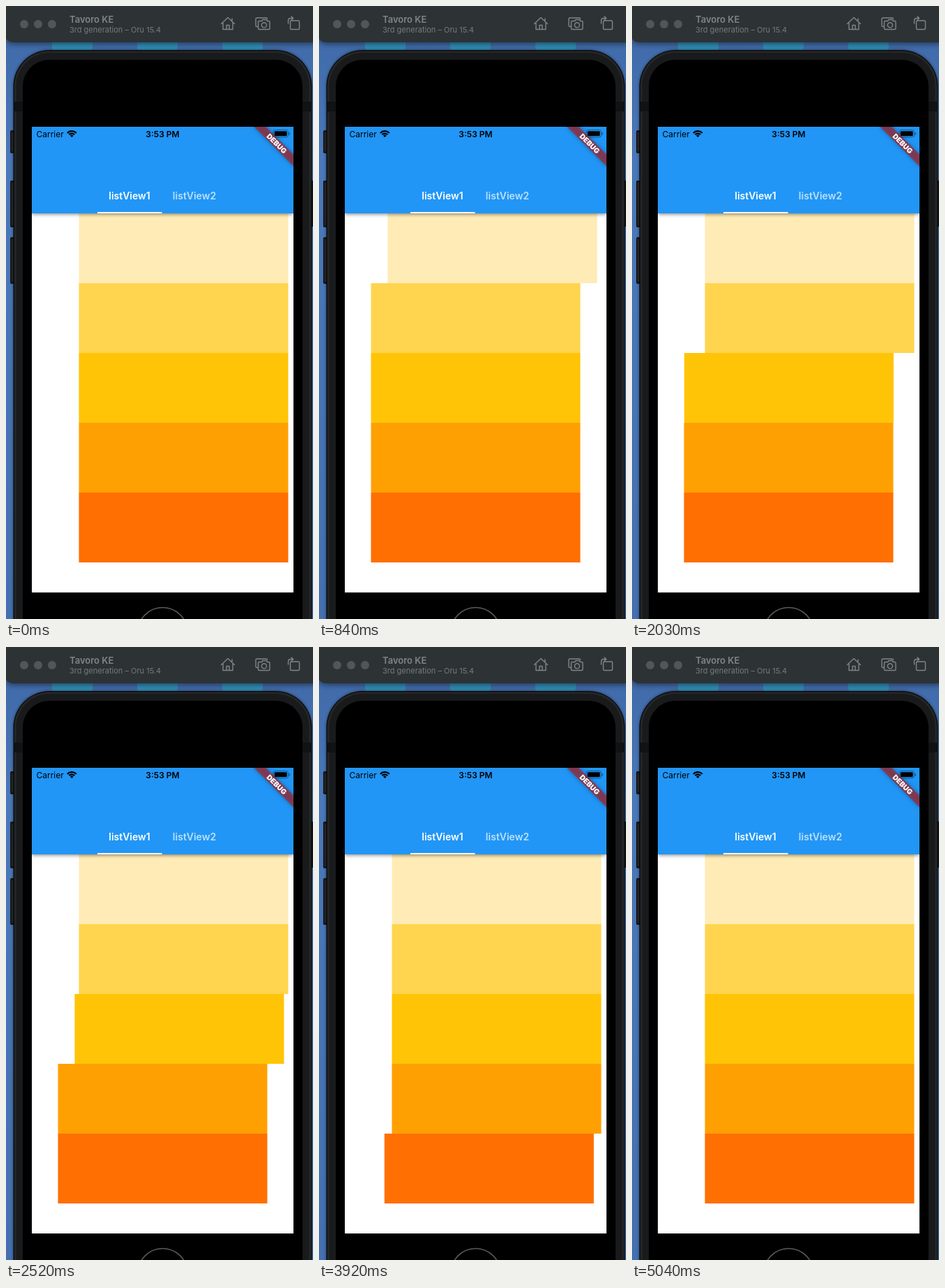
Write an HTML page with a canvas that moves like this. It is 440 by 878 pixels and loops after 5.18 s.

```html
<!DOCTYPE html>
<html lang="en">
<head>
<meta charset="utf-8">
<title>Bouncing rows</title>
<style>
  html, body { margin: 0; width: 100%; height: 100%; overflow: hidden; background: #000; }
  canvas { display: block; width: 440px; height: 878px; }
</style>
</head>
<body>
<canvas id="stage" width="440" height="878"></canvas>
<script>
const W = 440, H = 878;
const ctx = document.getElementById('stage').getContext('2d');
const FONT = 'Inter, Roboto, sans-serif';

const LOOP = 5180, STEP = 70;
const RESET = 280, START = 315, ROW_TIME = 840;
const SCREEN = { x: 37, y: 173, w: 375, h: 667 };
const BAR_H = 124;
const ROW = { x: 74.5, y: 297, w: 300, h: 100, shift: 30 };
const COLORS = ['#ffebb5', '#ffd54f', '#ffc406', '#ffa002', '#ff6f02'];

function bounceOut(t) {
  if (t < 1 / 2.75) return 7.5625 * t * t;
  if (t < 2 / 2.75) { t -= 1.5 / 2.75; return 7.5625 * t * t + 0.75; }
  if (t < 2.5 / 2.75) { t -= 2.25 / 2.75; return 7.5625 * t * t + 0.9375; }
  t -= 2.625 / 2.75;
  return 7.5625 * t * t + 0.984375;
}

function rect(x, y, w, h, color) {
  ctx.fillStyle = color;
  ctx.fillRect(x, y, w, h);
}

function rounded(x, y, w, h, r, color) {
  ctx.fillStyle = color;
  ctx.beginPath();
  ctx.roundRect(x, y, w, h, r);
  ctx.fill();
}

function disc(x, y, r, color) {
  ctx.fillStyle = color;
  ctx.beginPath();
  ctx.arc(x, y, r, 0, Math.PI * 2);
  ctx.fill();
}

function text(str, x, y, font, color, align = 'left') {
  ctx.font = `${font} ${FONT}`;
  ctx.fillStyle = color;
  ctx.textAlign = align;
  ctx.textBaseline = 'alphabetic';
  ctx.fillText(str, x, y);
}

function line(path, color, width) {
  ctx.strokeStyle = color;
  ctx.lineWidth = width;
  ctx.lineJoin = ctx.lineCap = 'round';
  ctx.stroke(new Path2D(path));
}

function withShadow(color, blur, dy, draw) {
  ctx.save();
  ctx.shadowColor = color;
  ctx.shadowBlur = blur;
  ctx.shadowOffsetY = dy;
  draw();
  ctx.restore();
}

function drawDesktop() {
  const g = ctx.createLinearGradient(0, 52, 0, H);
  g.addColorStop(0, '#416baa');
  g.addColorStop(0.2, '#4a78ba');
  g.addColorStop(1, '#4470b0');
  rect(0, 0, W, H, g);
  for (const x of [66, 188, 310]) rounded(x, 40, 58, 23, 3, '#318db5');
}

function drawToolbar() {
  withShadow('rgba(0,0,0,.5)', 8, 2, () =>
    rounded(-1, -12, 450, 64, 10, '#2d3235'));
  for (const x of [26, 46, 66]) disc(x, 26, 6, '#535658');
  text('Tavoro KE', 91, 24, '600 13px', '#818587');
  text('3rd generation – Oru 15.4', 91, 38, '400 11px', '#777b7d');

  const c = '#818587';
  line('M308.5 25.5 L318 16.5 L327.5 25.5 M311 24 V33.5 H325 V24 M316 33 V27.5 H320 V33 M324 18 V21', c, 1.4);
  line('M361 29.5 H359.5 Q358 29.5 358 28 V18.5 Q358 17 359.5 17 H373 Q374.5 17 374.5 18.5', c, 1.4);
  line('M363 21.5 H366.5 L368 19.5 H373 L374.5 21.5 H376.5 Q378 21.5 378 23 V32 Q378 33.5 376.5 33.5 H363 Q361.5 33.5 361.5 32 V23 Q361.5 21.5 363 21.5 Z', c, 1.4);
  line('M373.5 27.3 A3.6 3.6 0 1 1 366.3 27.3 A3.6 3.6 0 1 1 373.5 27.3', c, 1.4);
  line('M409 21 H419 Q420.5 21 420.5 22.5 V32 Q420.5 33.5 419 33.5 H409 Q407.5 33.5 407.5 32 V22.5 Q407.5 21 409 21 Z', c, 1.4);
  line('M404.5 25 V21 Q404.5 17.5 408 17.5 H411.5 M409 15 L411.8 17.5 L409 20', c, 1.4);
}

function drawPhone() {
  for (const [y, h] of [[178, 33], [250, 67], [331, 67]]) {
    rounded(6, y, 8, h, 2, '#171819');
    rect(8, y + 3, 2, h - 6, '#292b2c');
  }
  rounded(436, 250, 8, 66, 2, '#171819');
  withShadow('rgba(0,0,0,.45)', 4, 0, () =>
    rounded(10.5, 63, 428, 900, 52, '#0c0d0e'));
  rounded(12, 64.5, 425, 900, 50, '#252728');
  rounded(14.5, 67, 420, 900, 48, '#191a1b');
  rect(12, 137, 12, 14, '#111213');
  rect(425, 137, 12, 14, '#111213');
  rounded(24, 77, 401, 900, 38, '#000');

  ctx.strokeStyle = '#5b5b5b';
  ctx.lineWidth = 1.5;
  ctx.beginPath();
  ctx.arc(224.5, 897, 35.5, 0, Math.PI * 2);
  ctx.stroke();
}

function drawRows(time) {
  COLORS.forEach((color, i) => {
    const t = (time - START) / ROW_TIME - i;
    const p = time < RESET || t >= 1 ? 1 : t <= 0 ? 0 : bounceOut(t);
    rect(ROW.x + ROW.shift * p, ROW.y + i * ROW.h, ROW.w, ROW.h, color);
  });
}

function drawBanner() {
  ctx.save();
  ctx.translate(SCREEN.x + SCREEN.w, SCREEN.y);
  ctx.rotate(Math.PI / 4);
  withShadow('rgba(0,0,0,.5)', 6, 0, () => rect(-40, 28, 80, 12, 'rgba(183,28,28,.627)'));
  text('DEBUG', 0, 37.7, '900 10.2px', '#fff', 'center');
  ctx.restore();
}

function drawStatus() {
  text('Carrier', 43.5, 188, '400 12px', '#000');
  text('3:53 PM', 224.5, 188, '600 12px', '#000', 'center');

  // Wi-Fi: two arcs above a small wedge
  ctx.strokeStyle = '#000';
  ctx.lineCap = 'butt';
  ctx.lineWidth = 2.1;
  for (const r of [5.4, 8.9]) {
    ctx.beginPath();
    ctx.arc(94.3, 188, r, -Math.PI * 0.76, -Math.PI * 0.24);
    ctx.stroke();
  }
  ctx.fillStyle = '#000';
  ctx.beginPath();
  ctx.moveTo(94.3, 188);
  ctx.arc(94.3, 188, 3.2, -Math.PI * 0.76, -Math.PI * 0.24);
  ctx.fill();

  ctx.strokeStyle = 'rgba(0,0,0,.4)';
  ctx.lineWidth = 1;
  ctx.beginPath();
  ctx.roundRect(383, 177.5, 21.5, 10.5, 2.7);
  ctx.stroke();
  rounded(384.8, 179.2, 17.9, 7.1, 1.4, '#000');
  rounded(405.5, 181, 1.4, 3.8, 0.7, 'rgba(0,0,0,.45)');
}

function drawScreen(time) {
  const { x, y, w, h } = SCREEN;
  ctx.save();
  ctx.beginPath();
  ctx.rect(x, y, w, h);
  ctx.clip();
  rect(x, y, w, h, '#fff');
  drawRows(time);
  withShadow('rgba(0,0,0,.45)', 5, 1.5, () => rect(x, y, w, BAR_H, '#2196f6'));
  text('listView1', 177, 276.5, '600 14px', '#fff', 'center');
  text('listView2', 270, 276.5, '600 14px', 'rgba(255,255,255,.7)', 'center');
  rect(131, 295, 92.5, 2, '#fff');
  drawBanner();
  drawStatus();
  ctx.restore();
}

function render(time) {
  drawDesktop();
  drawPhone();
  drawToolbar();
  drawScreen(time);
}

const origin = performance.now();
function tick() {
  const time = (performance.now() - origin) % LOOP;
  render(Math.floor(time / STEP) * STEP);
  requestAnimationFrame(tick);
}
tick();
</script>
</body>
</html>
```
